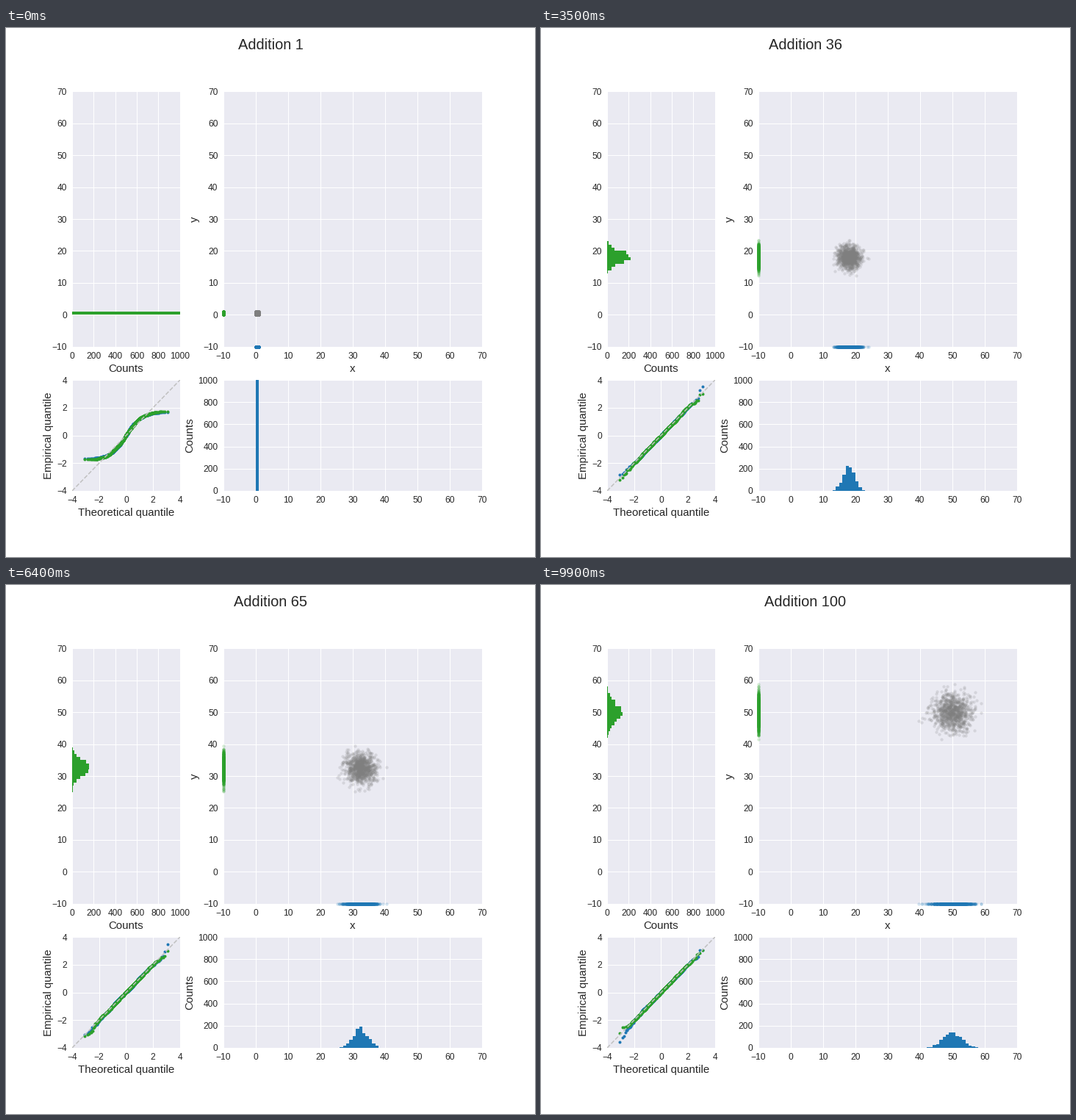
Animation, 720 px wide and 720 px high, one loop 10000 ms. Source, as a matplotlib script:

```python
import math

import numpy as np
import matplotlib.pyplot as plt
from matplotlib.animation import FuncAnimation

STEPS, WALKERS = 100, 1000
BLUE, GREEN, GRAY = "tab:blue", "tab:green", "tab:gray"

plt.rcParams.update({
    "font.family": "Liberation Sans",
    "text.color": ".15",
    "axes.labelcolor": ".15",
    "axes.labelsize": 15,
    "axes.facecolor": "#EAEAF2",
    "axes.grid": True,
    "axes.axisbelow": True,
    "axes.linewidth": 0,
    "grid.color": "white",
    "grid.linewidth": 1,
})

# Running sums of uniform draws, one row per addition
rng = np.random.default_rng(12)
xs, ys = rng.random((2, STEPS, WALKERS)).cumsum(axis=1)

# Normal quantiles at i / (n + 1), by inverting the CDF numerically
z = np.linspace(-4, 4, 4001)
cdf = [0.5 * (1 + math.erf(v / math.sqrt(2))) for v in z]
theory = np.interp(np.arange(1, WALKERS + 1) / (WALKERS + 1), cdf, z)


def standardized(values):
    return np.sort((values - values.mean()) / values.std())


def setup(ax, xlim, ylim, xstep, ystep, xlabel="", ylabel=""):
    ax.set(xlim=xlim, ylim=ylim, xlabel=xlabel, ylabel=ylabel,
           xticks=np.arange(xlim[0], xlim[1] + 1, xstep),
           yticks=np.arange(ylim[0], ylim[1] + 1, ystep))
    ax.tick_params(length=0, pad=7, labelsize=12, labelcolor=".15")
    for spine in ax.spines.values():
        spine.set_visible(False)


def dots(ax, color, size=8.6, **kw):
    return ax.plot([], [], ".", color=color, ms=size, mew=0, **kw)[0]


fig = plt.figure(figsize=(10, 10), dpi=72, facecolor="white")
grid = fig.add_gridspec(3, 3, left=0.125, right=0.9, bottom=0.125, top=0.88,
                        wspace=0.4, hspace=0.3)
ax_y = fig.add_subplot(grid[:2, 0])
ax_xy = fig.add_subplot(grid[:2, 1:])
ax_qq = fig.add_subplot(grid[2, 0])
ax_x = fig.add_subplot(grid[2, 1:])

span, counts = (-10, 70), (0, 1000)
setup(ax_y, counts, span, 200, 10, xlabel="Counts")
setup(ax_xy, span, span, 10, 10, "x", "y")
setup(ax_qq, (-4, 4), (-4, 4), 2, 2,
      "Theoretical quantile", "Empirical quantile")
setup(ax_x, span, counts, 10, 200, ylabel="Counts")

title = fig.suptitle("", fontsize=20)
cloud = dots(ax_xy, GRAY, alpha=0.2)
rug_x = dots(ax_xy, BLUE, alpha=0.2, clip_on=False)
rug_y = dots(ax_xy, GREEN, alpha=0.2, clip_on=False)
qq_x = dots(ax_qq, BLUE, 8)
qq_y = dots(ax_qq, GREEN, 8)
ax_qq.plot([-4, 4], [-4, 4], "--", color="silver", lw=1.5, zorder=3)

edges = np.arange(span[0], span[1] + 1)
zeros = np.zeros(len(edges) - 1)
bars_x = ax_x.bar(edges[:-1], zeros, width=1, align="edge",
                  color=BLUE, linewidth=0)
bars_y = ax_y.barh(edges[:-1], zeros, height=1, align="edge",
                   color=GREEN, linewidth=0)
ax_x.set_ylim(counts)
ax_y.set_xlim(counts)
floor = np.full(WALKERS, span[0])


def update(i):
    x, y = xs[i], ys[i]
    title.set_text(f"Addition {i + 1}")
    cloud.set_data(x, y)
    rug_x.set_data(x, floor)
    rug_y.set_data(floor, y)
    qq_x.set_data(theory, standardized(x))
    qq_y.set_data(theory, standardized(y))
    for bar, n in zip(bars_x, np.histogram(x, edges)[0]):
        bar.set_height(n)
    for bar, n in zip(bars_y, np.histogram(y, edges)[0]):
        bar.set_width(n)
    return title, cloud, rug_x, rug_y, qq_x, qq_y, *bars_x, *bars_y


anim = FuncAnimation(fig, update, frames=STEPS, interval=100,
                     repeat=True, repeat_delay=0, blit=False)
plt.show()
```
